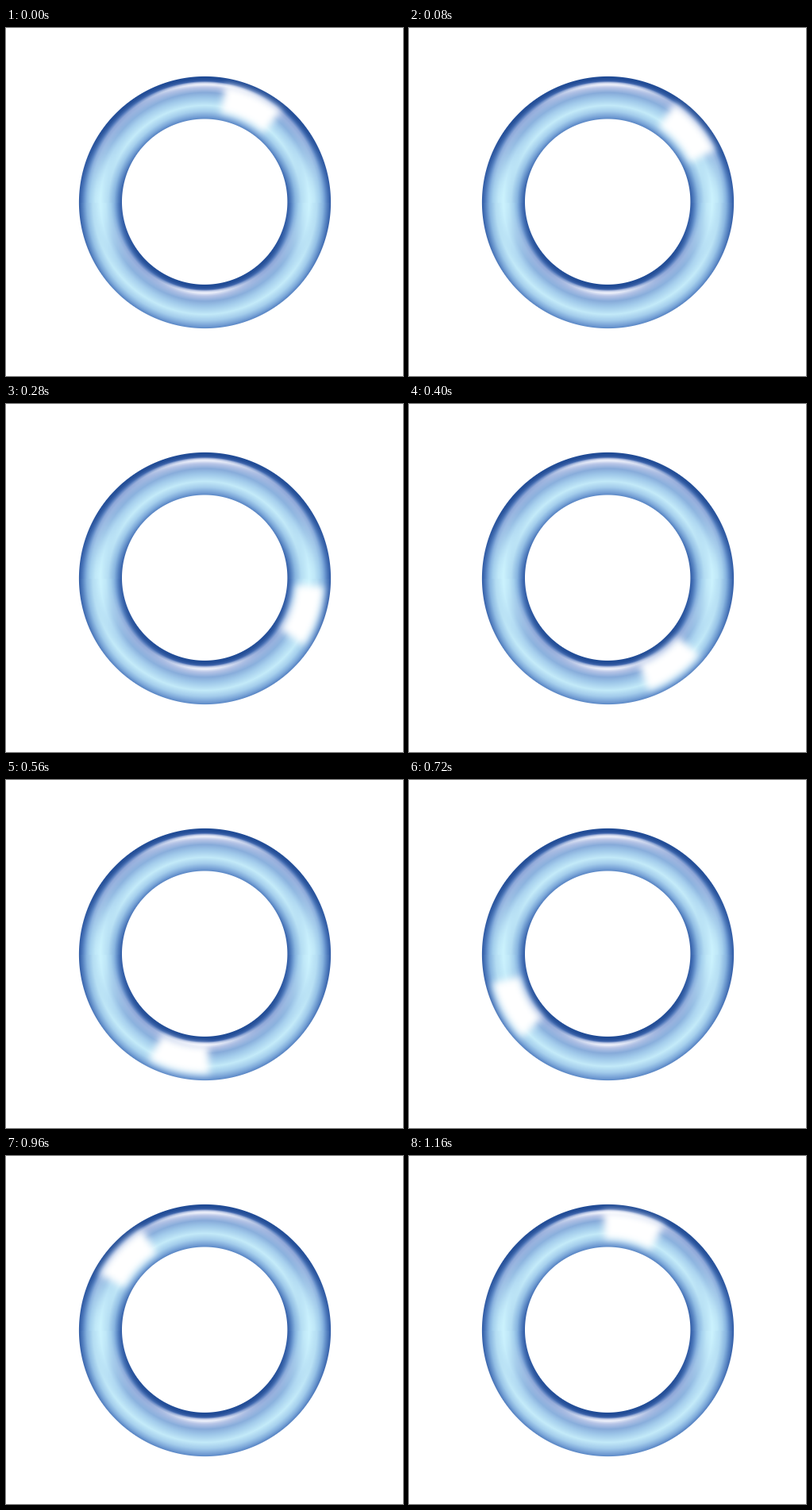
Recreate the animation shown at these times as an HTML page with a canvas. Size 500 by 438 pixels, loop 1200 ms.

```html
<!DOCTYPE html>
<html lang="en">
<head>
<meta charset="utf-8">
<title>Glass ring</title>
<style>
  html, body { margin: 0; width: 100%; height: 100%; overflow: hidden; background: #fff; }
  canvas, svg { position: absolute; left: 0; top: 0; display: block; }
</style>
</head>
<body>
<canvas id="ring" width="500" height="438"></canvas>
<svg width="500" height="438" viewBox="0 0 500 438">
  <defs>
    <clipPath id="band"><path id="bandPath" clip-rule="evenodd"/></clipPath>
    <filter id="soft" filterUnits="userSpaceOnUse" x="0" y="0" width="500" height="438">
      <feGaussianBlur stdDeviation="4.6"/>
    </filter>
  </defs>
  <g clip-path="url(#band)">
    <g id="glint"><path id="glintPath" fill="none" stroke="#fff" stroke-width="35" filter="url(#soft)"/></g>
  </g>
</svg>
<script>
const W = 500, H = 438;
const outer = { x: 250.5, y: 219.5, r: 158.6 };
const hole = { x: 250.2, y: 218.7, r: 104.2 };
const LOOP = 1200, STEP = 40, START = 25;

// Colours across the tube, outer edge to inner edge, at 0, 45 and 90 degrees from the top.
const stops = [0, .06, .11, .15, .19, .26, .38, .5, .68, .82, .92, 1];
const profiles = [
  "1f4a94 224c96 3a60a8 c3cde8 f0f2fb b9c6e7 86aad9 9cc5e8 c2e9f8 a2cbeb 7da7d9 5c89c7",
  "214c97 285299 3f68ae 6588c4 8ea6d7 98b2de 8bb2de a6cfed c4ebf9 a6d0ed 7fabdb 527fc0",
  "2f5aa4 4571b6 5f8cc8 76a3d7 8ab7e1 a4d0ed c0e8f8 cbf2fd b3dcf2 87b4df 527fbf 2f5aa4"
].map(row => row.split(" ").map(hex => [0, 2, 4].map(i => parseInt(hex.substr(i, 2), 16))));

const clamp = v => Math.max(0, Math.min(1, v));
const mix = (a, b, k) => a.map((v, i) => v + (b[i] - v) * k);

function across(profile, u) {
  let i = 0;
  while (i < stops.length - 2 && u > stops[i + 1]) i++;
  return mix(profile[i], profile[i + 1], (u - stops[i]) / (stops[i + 1] - stops[i]));
}

// The lower half repeats the upper half with inside and outside swapped.
function shade(angle, u) {
  if (angle > 90) { angle = 180 - angle; u = 1 - u; }
  const part = angle / 45, i = Math.min(1, Math.floor(part)), k = part - i;
  return mix(across(profiles[i], u), across(profiles[i + 1], u), k * k * (3 - 2 * k));
}

function drawRing() {
  const ctx = document.getElementById("ring").getContext("2d");
  const img = ctx.createImageData(W, H);
  for (let y = 0; y < H; y++) {
    for (let x = 0; x < W; x++) {
      const dx = x + .5 - outer.x, dy = y + .5 - outer.y;
      const fromOut = outer.r - Math.hypot(dx, dy);
      const fromIn = Math.hypot(x + .5 - hole.x, y + .5 - hole.y) - hole.r;
      const alpha = clamp(fromOut + .5) * clamp(fromIn + .5);
      if (!alpha) continue;
      const angle = Math.abs(Math.atan2(dx, -dy)) * 180 / Math.PI;
      const color = shade(angle, clamp(fromOut / (fromOut + fromIn)));
      img.data.set([...color.map(Math.round), Math.round(alpha * 255)], (y * W + x) * 4);
    }
  }
  ctx.putImageData(img, 0, 0);
}

const circle = ({ x, y, r }) =>
  `M${x - r} ${y}a${r} ${r} 0 1 0 ${2 * r} 0a${r} ${r} 0 1 0 ${-2 * r} 0Z`;

function setupGlint() {
  const r = 132.5, half = 15 * Math.PI / 180;
  const dx = r * Math.sin(half), y = outer.y - r * Math.cos(half);
  document.getElementById("bandPath").setAttribute("d", circle(outer) + circle(hole));
  document.getElementById("glintPath").setAttribute("d",
    `M${outer.x - dx} ${y}A${r} ${r} 0 0 1 ${outer.x + dx} ${y}`);
}

const glint = document.getElementById("glint");
function render(ms) {
  const step = Math.floor((ms % LOOP) / STEP);
  const angle = START + step * 360 * STEP / LOOP;
  glint.setAttribute("transform", `rotate(${angle} ${outer.x} ${outer.y})`);
}

drawRing();
setupGlint();
render(0);
const begin = performance.now();
(function tick() {
  render(performance.now() - begin);
  requestAnimationFrame(tick);
})();
</script>
</body>
</html>
```
